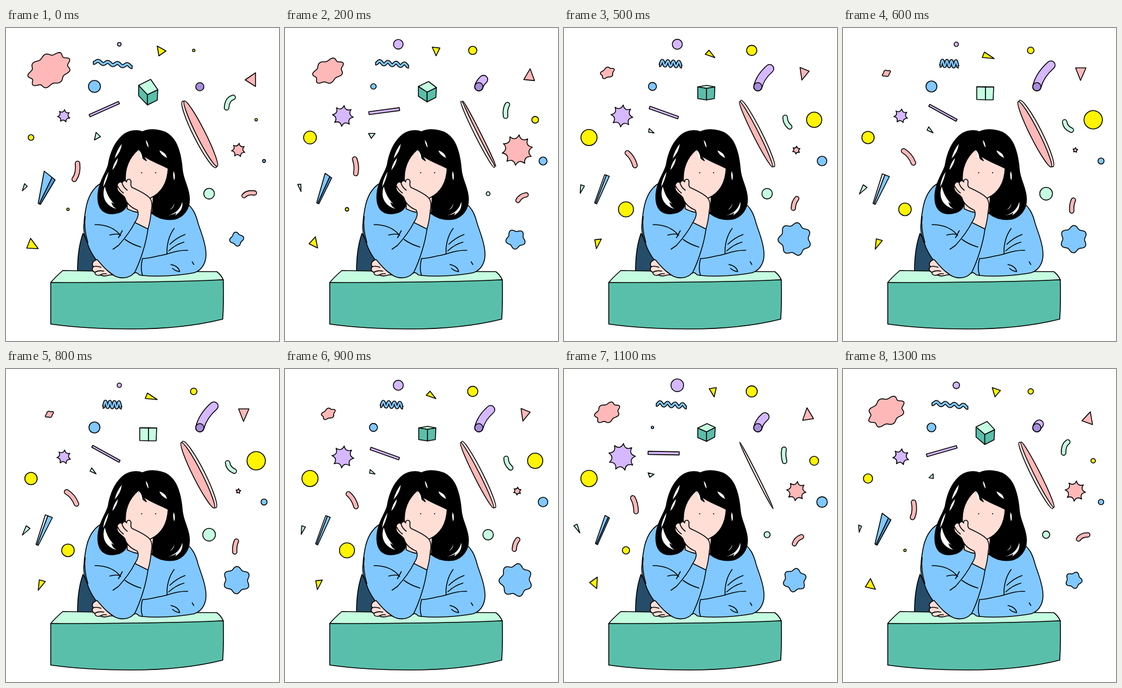
An HTML page with a canvas for the animation above (1.4 s loop, 500 by 573 pixels).

```html
<!DOCTYPE html>
<html lang="en">
<head>
<meta charset="utf-8">
<title>Daydream</title>
<style>
  html, body { margin: 0; width: 100%; height: 100%; overflow: hidden; background: #fff; }
  canvas { display: block; width: 500px; height: 573px; }
</style>
</head>
<body>
<canvas id="stage"></canvas>
<script>
const W = 500, H = 573, STEP = 100, STEPS = 14;
const INK = '#000', BLUE = '#80c8ff', DEEP = '#559bd8', PINK = '#ffb8b8', PALE = '#ffe9e5',
  SKIN = '#ffded6', MINT = '#c5fde1', TEAL = '#5abfaa', LILAC = '#d5b8ff',
  PURPLE = '#a68cdb', YELLOW = '#fff500', NAVY = '#254d69', ICE = '#e7f5ff';

const canvas = document.getElementById('stage');
const ctx = canvas.getContext('2d');
const dpr = window.devicePixelRatio || 1;
canvas.width = W * dpr;
canvas.height = H * dpr;
ctx.scale(dpr, dpr);
ctx.lineJoin = 'round';

let pose = 0;

// Moves from a (pose 0) through b (pose mid) to c (pose 6)
function mix(mid, a, b, c, p = pose) {
  if (Array.isArray(a)) return a.map((v, i) => mix(mid, v, b[i], c[i], p));
  return p < mid ? a + (b - a) * p / mid : b + (c - b) * (p - mid) / (6 - mid);
}

// The same for sizes that grow by a constant factor
const grow = (mid, ...sizes) => Math.exp(mix(mid, ...sizes.map(Math.log)));

function ink(path, fill, width = 1.6) {
  if (fill) { ctx.fillStyle = fill; ctx.fill(path); }
  if (width) {
    ctx.lineCap = 'round';
    ctx.lineWidth = width;
    ctx.strokeStyle = INK;
    ctx.stroke(path);
  }
}

const shape = (d, fill, width) => ink(new Path2D(d), fill, width);
const poly = (pts, fill) => shape('M' + pts.join(' ') + 'Z', fill);

function oval(x, y, rx, ry, fill) {
  const p = new Path2D();
  p.ellipse(x, y, rx, ry, 0, 0, Math.PI * 2);
  ink(p, fill);
}

function ball(x, y, fill, mid, a, b, c) {
  const r = Math.max(2.2, mix(mid, a, b, c));
  oval(x, y, r, r, fill);
}

// A thick outlined line
function tube(path, width, fill, cap = 'round') {
  ctx.lineCap = cap;
  for (const [w, color] of [[width, INK], [width - 3.2, fill]]) {
    ctx.lineWidth = w;
    ctx.strokeStyle = color;
    ctx.stroke(path);
  }
}

function bean([x0, y0, cx, cy, x1, y1], fill, width = 10) {
  tube(new Path2D(`M${x0} ${y0}Q${cx} ${cy} ${x1} ${y1}`), width, fill);
}

// Bigger stars have more spikes
function star(x, y, r, fill) {
  const n = Math.round(4 + r / 4.6), dip = r * (.08 + .05 * n);
  const at = (i, q) => {
    const a = i * Math.PI / n - Math.PI / 2 + .12;
    return [x + q * Math.cos(a), y + q * Math.sin(a)];
  };
  const p = new Path2D();
  p.moveTo(...at(0, r));
  for (let i = 1; i < 2 * n; i += 2) p.quadraticCurveTo(...at(i, dip), ...at(i + 1, r));
  p.closePath();
  ink(p, fill);
}

function blob(x, y, rx, ry, lobes, turn, fill) {
  const n = Math.round(lobes), depth = .5 / n + .03;
  const p = new Path2D(), c = Math.cos(turn), s = Math.sin(turn);
  for (let i = 0; i < 120; i++) {
    const a = i * Math.PI / 60;
    const k = (1 + depth * Math.cos(n * a)) / (1 + depth);
    const u = rx * k * Math.cos(a), v = ry * k * Math.sin(a);
    p.lineTo(x + u * c - v * s, y + u * s + v * c);
  }
  p.closePath();
  ink(p, fill);
}

// A spring that squeezes together
function wave() {
  const x0 = mix(3, 160, 169, 178), x1 = mix(3, 231, 224, 211), amp = mix(3, 2.4, 3, 5.4);
  const y0 = 61.5 + pose * .5, y1 = 69.5 - pose * .6;
  const path = new Path2D();
  for (let i = 0; i <= 80; i++) {
    const u = i / 80;
    path.lineTo(x0 + (x1 - x0) * u, y0 + (y1 - y0) * u + amp * Math.cos(u * Math.PI * 8));
  }
  tube(path, 7 - pose * .15, BLUE, 'butt');
  shape(`M${x0} ${y0 + amp - 2.5}v5M${x1} ${y1 + amp - 2.5}v5`);
}

function cube() {
  // back, right, front and left corner of the lid, then the height
  const [bx, by, rx, ry, fx, fy, lx, ly, h] = mix(3,
    [265, 94, 278, 113, 259, 122, 243, 105, 19],
    [262, 100, 277, 107, 261, 115, 245, 108, 17.5],
    [261, 107.5, 276, 108, 261, 108, 245, 107.5, 23.5], Math.min(pose, 6));
  const side = pose > 5 ? MINT : TEAL;
  poly([lx, ly, fx, fy, fx, fy + h, lx, ly + h], side);
  poly([rx, ry, fx, fy, fx, fy + h, rx - 1, ry + h], side);
  poly([bx, by, rx, ry, fx, fy, lx, ly], MINT);
}

function pipe() {
  const x = 355, y = 107.5;
  if (pose) bean([x, y, x + pose * .9, y - pose * 3.6, x + pose * 4.3, y - pose * 6.6], LILAC, 17);
  oval(x, y, 7.5, 7.5, PURPLE);
}

function stick() {
  const [x0, y0, x1, y1] = mix(3, [153, 160.5, 207, 136.5], [154, 153.5, 211, 154.5], [158, 141.5, 208, 169]);
  const d = Math.hypot(x1 - x0, y1 - y0), h = mix(3, 2.2, 2.9, 2);
  const nx = (y0 - y1) / d * h, ny = (x1 - x0) / d * h;
  poly([x0 + nx, y0 + ny, x1 + nx, y1 + ny, x1 - nx, y1 - ny, x0 - nx, y0 - ny], LILAC);
}

// A plate seen edge-on in the middle of its turn
function plate() {
  const half = Math.abs(pose - 3) * 2.7, side = pose > 3 ? -1 : 1;
  ctx.save();
  ctx.translate(355.5 - pose * .5, 194);
  ctx.rotate(Math.atan2(121, 61));
  oval(0, side * 1.8, 68, half + 2.2, PALE);
  if (half) oval(0, -side * 1.4, 67, half, PINK);
  ctx.restore();
}

function wedge() {
  const [ax, ay, bx, by, x, y] = mix(4,
    [70, 262, 90, 278, 61, 323], [77, 270, 81, 271, 59, 321], [72, 267, 85, 272, 57, 323]);
  const front = pose < 4, u = front ? .72 : .36;
  const mx = ax + (bx - ax) * u, my = ay + (by - ay) * u;
  poly([ax, ay, mx, my, x, y - 1, x - 2, y - 2], front ? BLUE : ICE);
  poly([mx, my, bx, by, x + 2, y, x, y - 1], front ? DEEP : BLUE);
}

function drawShapes() {
  const size = 42 - pose * 5.6;
  blob(79.5, 77 + pose, size, size * .7, 9 - pose * .8, -.5, PINK);
  wave();
  cube();
  pipe();
  stick();
  plate();
  wedge();

  ball(207.5, 29.8, LILAC, 4, 3.3, 14.3, 4);
  ball(343.8, 41, YELLOW, 4, 2.3, 12.8, 6);
  ball(162, 107, BLUE, 3, 11, 2, 10);
  ball(45.8, 200.5, YELLOW, 4, 5.2, 18.2, 11.3);
  ball(458.2, 168, YELLOW, 3, 2, 8.2, 16.8);
  ball(472.6, 243.5, BLUE, 4, 2.6, 12, 5.5);
  ball(372, 303.3, MINT, 2, 9.8, 3.5, 11.6);
  ball(113.5, 332, YELLOW, 5, -4, 13.8, 11.5);

  star(106, 161, grow(4, 11.5, 32, 12.8), LILAC);
  star(425.5, 223.5, grow(2, 12.5, 28, 4.6), PINK);
  const r = grow(5, 13, 30.5, 25);
  blob(422.5, 386.5, r, r, 2.5 + r / 7, pose * .3 - .2, BLUE);

  poly(mix(3, [277, 33, 293, 42, 280, 51], [266, 36, 279, 34, 275, 51], [255, 54, 259, 44, 277, 56]), YELLOW);
  poly(mix(3, [438, 95, 457, 82, 457, 107], [437, 94, 445, 71, 457, 91], [435, 96, 426, 73, 445, 73]), PINK);
  poly(mix(3, [45, 385, 38, 403, 59, 404], [61, 381, 47, 391, 60, 402], [72, 389, 61, 386, 59, 405]), YELLOW);
  poly(mix(2, [165, 191, 162, 205, 173, 199], [165, 193, 153, 193, 158, 202], [165, 192, 157, 181, 154, 187]), MINT);
  poly(mix(3, [34, 285, 39, 290, 30, 298], [18, 287, 24, 284, 29, 300], [37, 287, 44, 292, 30, 304]), MINT);

  bean(mix(3, [404, 146, 405, 130, 416, 127], [404, 169, 401, 157, 403, 147], [418, 187, 407, 182, 406, 172]), MINT);
  bean(mix(3, [436, 307, 442, 300, 455, 302], [422, 320, 425, 311, 435, 307], [419, 335, 418, 324, 422, 315]), PINK, 9.5);
  bean(mix(3, [131, 248, 133, 266, 125, 277], [126, 236, 132, 247, 132, 261], [111, 225, 123, 232, 129, 247]), PINK);
}

function drawDesk() {
  shape('M141 376C136 390 131 410 131 445L185 450L152 395Z', NAVY);
  shape('M82 466C88 458 96 451 104 444C190 446 290 445 386 446Q394 452 398 461L240 470Z', MINT);
  shape('M82 466C180 466 300 465 398 461Q399 500 397 533C345 546 290 551 230 551C175 551 125 548 82 542Z', TEAL);
}

function drawSweater() {
  shape('M174 284C157 294 149 314 146 332C144 344 143 350 143 357C140 375 148 390 152 402C162 425 180 442 196 452C208 460 225 459 234 449C238 446 241 449 244 452L250 453C280 456 320 453 345 448C362 442 368 425 366 408C364 388 357 374 352 358C347 338 341 329 332 321L250 290Z', BLUE);
  shape('M145 345C143 360 145 377 150 393M163 360C183 360 200 367 210 380M190 379Q200 376 209 378M213 371L206 384M218 387Q230 396 247 401');
  shape('M236 356C228 372 215 388 206 398L196 405M260 368C257 392 247 425 235 449');
  shape('M308 367C298 380 294 398 295 414M328 378Q312 384 300 396M326 392Q311 396 298 408M333 407C310 406 297 415 280 417C268 420 258 422 250 422C247 434 247 444 250 453M302 433C312 435 317 440 318 446Q310 445 305 440M341 428L344 433');
}

function drawHead() {
  shape('M250 190C240 186 224 187 212 198C197 212 190 233 187 252C183 264 176 274 172 287C167 302 167 318 172 328C179 341 194 342 207 338C215 335 221 330 222 320L268 340C280 350 294 352 309 350C325 346 336 332 336 314C336 293 325 280 323 260C321 235 316 211 302 198C288 184 262 184 250 190Z', INK);
  shape('M222 305L222 331Q234 337 244 338L268 338L270 306Z', SKIN);
  shape('M243 222C245 232 249 239 257 243L251 233C264 244 281 248 297 257C296 279 288 300 265 311L222 318L219 283C217 262 222 240 243 222Z', SKIN);
  for (const x of [248.5, 274]) oval(x, 265, .3, .3, INK);

  const white = d => shape(d, '#fff', 0);
  white('M212 212Q202 225 199 239Q211 226 212 212ZM205 238Q196 249 195 260Q204 249 205 238Z');
  white('M243 223Q244 233 250 242Q250 229 243 223ZM256 205Q257 214 261 219Q261 210 256 205ZM281 224Q283 232 295 238Q293 228 281 224Z');
  white('M188 263Q179 277 178 291Q185 279 188 263ZM181 290C175 306 180 325 202 331Q194 326 193 319L198 322C189 312 184 303 181 290Z');
  white('M307 262Q311 270 308 279Q305 270 307 262ZM323 318C319 332 310 340 297 343Q306 342 312 338L310 343C321 336 324 328 323 318ZM308 320Q307 328 300 333Q308 330 308 320Z');
}

function drawHands() {
  shape('M236 356C242 347 244 339 240 333C229 329 220 320 218 311C214 304 201 300 204 290C203 285 208 280 213 283C216 277 220 280 221 282C220 276 228 275 229 281C229 286 227 288 231 292C242 297 255 303 262 310C268 316 268 324 266 335C265 347 263 358 260 368Z', SKIN);
  shape('M205 290Q208 297 215 302M212 282Q214 291 222 297');
  shape('M167 424C159 426 156 432 160 437C156 441 158 446 163 447C162 452 168 454 173 452C177 455 185 454 190 452L196 452L188 446C180 440 174 432 167 424Z', SKIN);
  shape('M160 437Q166 435 174 438M163 447Q169 443 179 445M173 452Q178 449 184 450');
}

function draw() {
  ctx.fillStyle = '#fff';
  ctx.fillRect(0, 0, W, H);
  drawShapes();
  drawDesk();
  drawSweater();
  drawHead();
  drawHands();
}

// Eight poses played forth and back
const start = performance.now();
let shown = -1;
function tick(now) {
  const k = Math.floor(Math.max(0, now - start) / STEP) % STEPS;
  if (k !== shown) {
    pose = Math.min(k, STEPS - k);
    draw();
    shown = k;
  }
  requestAnimationFrame(tick);
}
tick(start);
</script>
</body>
</html>
```
